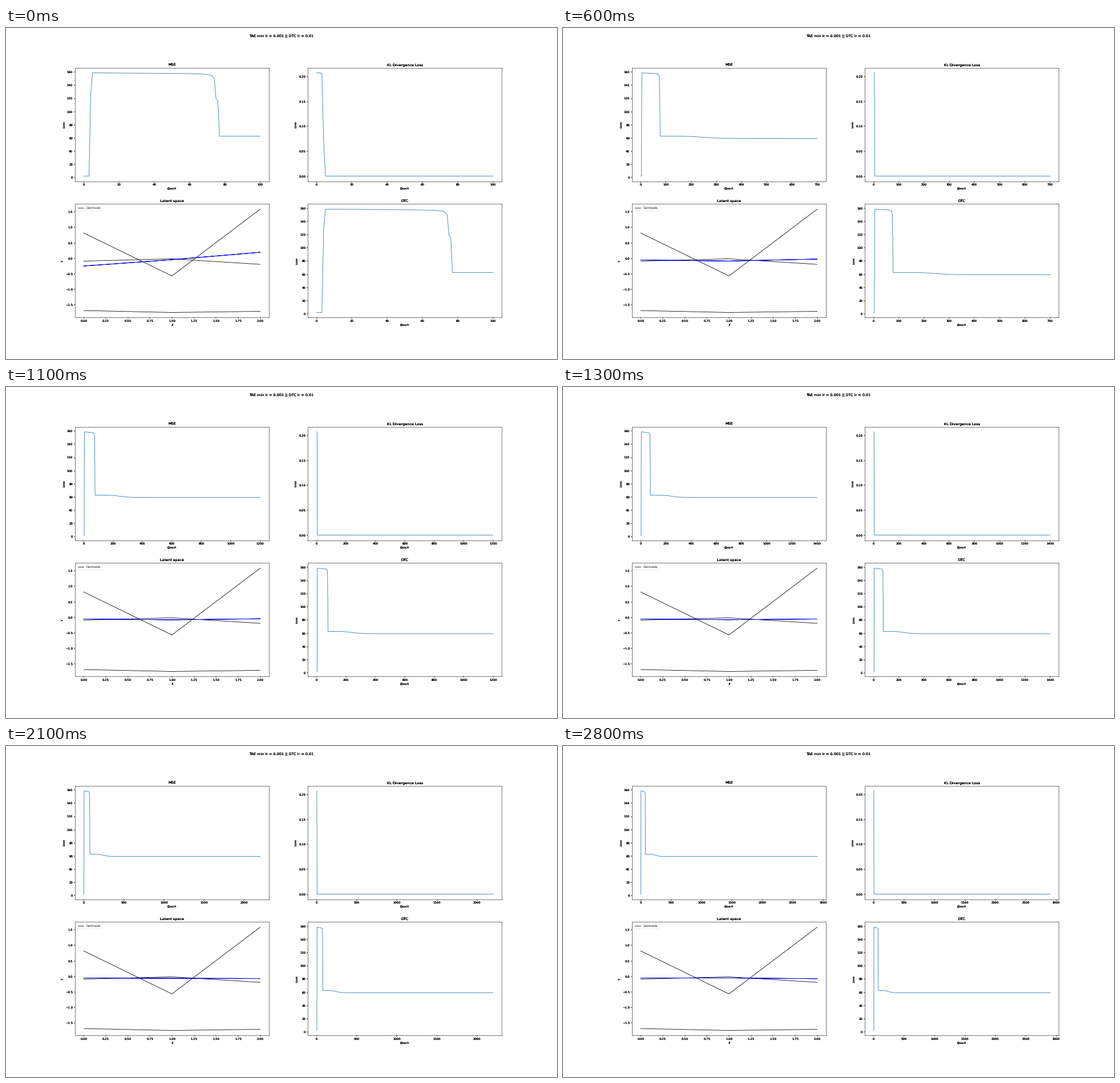
A matplotlib script for the animation above (2.9 s loop, 966x580 px).

```python
import numpy as np
import matplotlib.pyplot as plt
from matplotlib.animation import FuncAnimation

WIDTH, HEIGHT, DPI = 966, 580, 38.64
FRAMES, INTERVAL, STEP = 29, 100, 100

plt.rcParams["font.family"] = "DejaVu Sans"
plt.rcParams["text.hinting"] = "none"
plt.rcParams["axes.linewidth"] = 1.0

CENTROIDS = [(.82, -.563, 1.585), (-.087, -.012, -.19), (-1.678, -1.739, -1.703)]


def fall(epoch, middle, width):
    """Smooth step from 1 down to 0 around the middle epoch."""
    return 1 / (1 + np.exp(np.clip((epoch - middle) / width, -50, 50)))


def loss(epoch):
    plateau = 159.1 - .015 * epoch - 8 / np.maximum(75 - epoch, 1)
    tail = 59.4 + 3.4 * fall(epoch, 245, 28)
    values = np.where(epoch < 4, 2, np.where(epoch < 75, plateau, tail))
    values[4] = 128.5
    values[75:77] = 119.5, 116
    return values


def divergence(epoch):
    return .2071 * fall(epoch, 3.876, 1 / 6)


def latent(epoch):
    """Heights at x = 0, 1, 2: an early kick fades, then a slow drift."""
    t = epoch / 1000
    drift = np.array([-.05, -.095 + .0155 * t, -.08 + .12 * np.exp(-t)])
    kick = np.array([-.195, .054, .17])
    return drift + kick * np.sqrt(fall(epoch, 245, 28))


def harden(image, dpi):
    """Make antialiased black marks crisper and heavier."""
    crisp = np.zeros_like(image)
    crisp[..., 3] = np.clip(image[..., 3] * 2, 0, 1)
    return crisp, 0, 0


def style(ax, title, xlabel, ylabel):
    ax.set_title(title).set_agg_filter(harden)
    ax.set_xlabel(xlabel, style="italic")
    ax.set_ylabel(ylabel, style="italic")
    for axis in (ax.xaxis, ax.yaxis):
        axis.set_agg_filter(harden)


fig, axes = plt.subplots(2, 2, figsize=((WIDTH + .01) / DPI, (HEIGHT + .01) / DPI),
                         dpi=DPI, facecolor="white")
fig.subplots_adjust(left=.125, right=.9, bottom=.125, top=.88, wspace=.2, hspace=.2)
fig.suptitle("TAE min lr = 0.001 || DTC lr = 0.01", fontsize=12).set_agg_filter(harden)
(mse_ax, kl_ax), (latent_ax, dtc_ax) = axes

style(mse_ax, "MSE", "Epoch", "Loss")
style(kl_ax, "KL Divergence Loss", "Epoch", "Loss")
style(latent_ax, "Latent space", "X", "Y")
style(dtc_ax, "DTC", "Epoch", "Loss")

plots = [(ax, ax.plot([], [], color="#1f77b4", lw=1.5)[0], rule)
         for ax, rule in ((mse_ax, loss), (kl_ax, divergence), (dtc_ax, loss))]

for i, ys in enumerate(CENTROIDS):
    latent_ax.plot(range(3), ys, color="black", lw=1.5,
                   label="Centroids" if i == 0 else None)
# Several coinciding curves lie on top of each other.
latent_lines = [latent_ax.plot(range(3), latent(STEP), color=c, lw=1.5)[0]
                for c in ("black", "blue", "blue", "blue")]
latent_ax.legend(loc="upper left")


def update(frame):
    last = STEP * (frame + 1)
    epochs = np.arange(last + 1)
    for ax, line, rule in plots:
        line.set_data(epochs, rule(epochs))
        ax.relim()
        ax.autoscale_view()
    for line in latent_lines:
        line.set_ydata(latent(last))
    return []


anim = FuncAnimation(fig, update, frames=FRAMES, interval=INTERVAL,
                     repeat=True, repeat_delay=0, blit=False)
plt.show()
```
